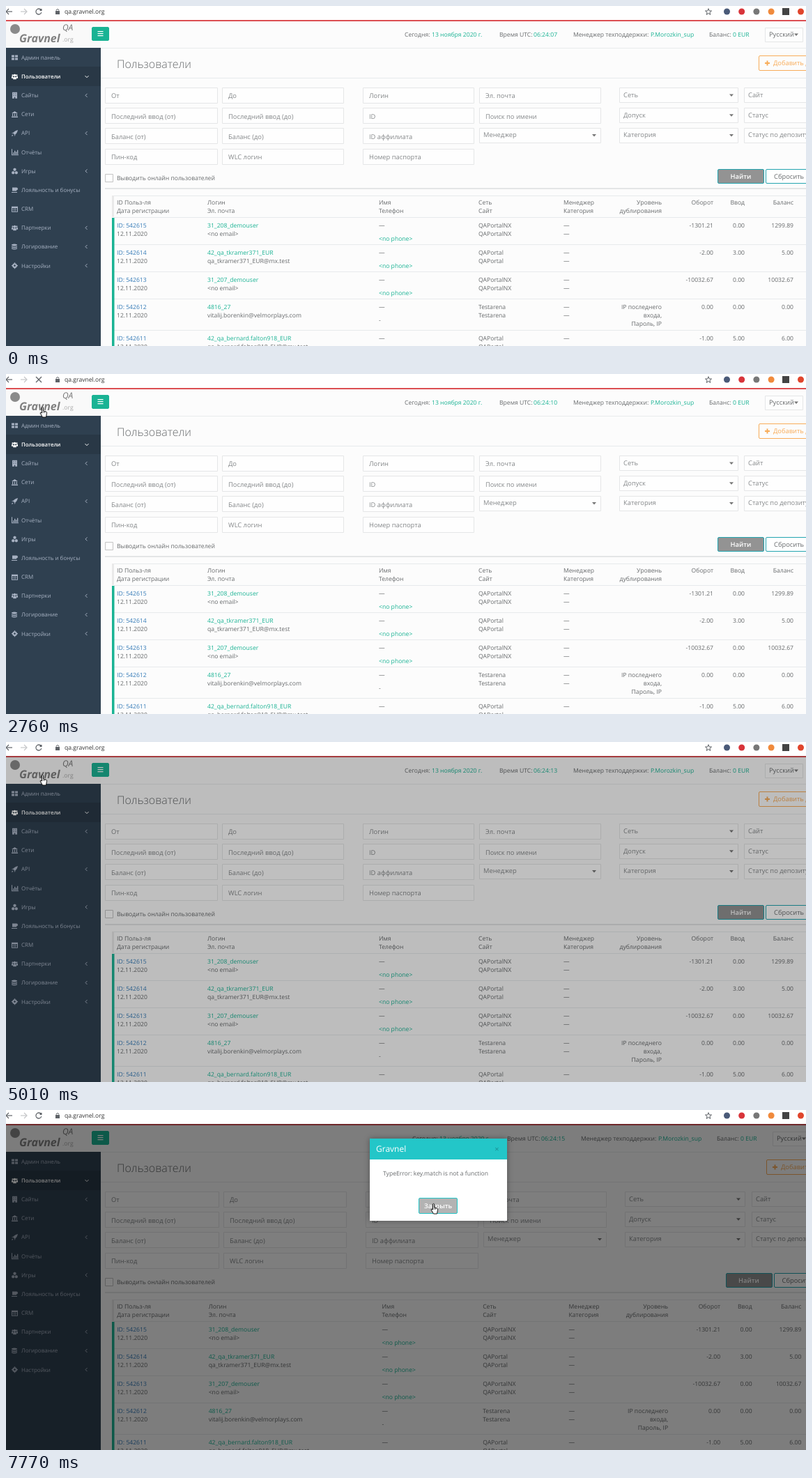
An HTML page with a canvas for the animation above (8000 ms loop, 1148 by 488 pixels).

```html
<!DOCTYPE html>
<html lang="ru">
<head>
<meta charset="utf-8">
<style>
html, body { margin: 0; width: 100%; height: 100%; overflow: hidden; background: #fff; }
canvas { display: block; }
</style>
</head>
<body>
<canvas id="stage" width="1148" height="488"></canvas>
<script>
const W = 1148, H = 488, LOOP = 8000;
const c = document.getElementById('stage').getContext('2d');
const GREY = '#676a6c', GREEN = '#1ab394', BLUE = '#337ab7', LINE = '#e5e6e7',
      TEAL = '#23a5b0', ORANGE = '#f8ac59', NAVY = '#2f4050';

// Stepped tracks: [start time, values...]
const CURSOR = [[0, -50, 0], [650, 985, 450], [770, 868, 386], [920, 390, 183], [1070, 246, 106],
  [1190, 155, 62], [1310, 110, 50], [1430, 88, 46], [1580, 72, 50], [1700, 56, 50, 1], [1820, 52, 48, 1],
  [6070, 150, 70], [6190, 430, 120], [6310, 697, 132], [6450, 640, 138], [6570, 622, 137, 1], [6720, 613, 135, 1]];
const CLOCK = [[0, 7], [650, 8], [1700, 9], [2760, 10], [3660, 11], [4620, 12], [4740, 13], [6720, 14], [7770, 15]];
const ENTRY = [[0, 0, 1], [4190, 0, 0], [4340, 16, .12], [4470, 13, .3], [4620, 8, .6], [4740, 4, .85], [4890, 2, .95], [5010, 0, 1]];
const DIM = [[0, 0], [5010, .25], [5130, .5]];
const MODAL = [[0, 0], [5270, .4], [5400, .75], [5550, .92], [5800, 1]];
const at = (track, t) => track.findLast(k => k[0] <= t);

const MENU = ['Админ панель', 'Пользователи', 'Сайты', 'Сети', 'API', 'Отчёты', 'Игры',
  'Лояльность и бонусы', 'CRM', 'Партнерки', 'Логирование', 'Настройки'];
const OPENABLE = [1, 2, 4, 6, 9, 10, 11];
const PEOPLE = 'M4.5 1a1.8 1.8 0 1 1-.01 0zM1.6 1.5a1.2 1.2 0 1 1-.01 0zM7.4 1.5a1.2 1.2 0 1 1-.01 0zM2.2 8.5V6q0-1 1-1h2.6q1 0 1 1v2.5zM0 7V5q0-.8 1-.8h1V7zM7 7V4.2h1q1 0 1 .8v2z';
const ICONS = [
  'M0 1h4v3H0zM5 1h4v3H5zM0 5h4v3H0zM5 5h4v3H5z',
  PEOPLE,
  'M1 0h7v9H1zM2.5 1.5h1v1h-1zM5.5 1.5h1v1h-1zM2.5 4h1v1h-1zM5.5 4h1v1h-1zM3.8 7h1.4v2H3.8z',
  'M0 3L4.5 0 9 3zM1 3.5h1.2V7H1zM3.9 3.5h1.2V7H3.9zM6.8 3.5H8V7H6.8zM0 7.5h9V9H0z',
  'M9 0Q8 5 4.5 7L2 4.5Q4 1 9 0zM0 5l3-2-1.5 2zM4 9l2-2.5-2 1zM0 9l1-2.5L2.5 8z',
  'M0 0h1v8h9v1H0zM2 5h1.3v2.5H2zM4 2.5h1.3v5H4zM6 4h1.3v3.5H6zM8 1.5h1.3v6H8z',
  'M4.5 0l2 1v2.5l-2 1-2-1V1zM2.2 4.5l2 1V8l-2 1-2-1V5.5zM6.8 4.5l2 1V8l-2 1-2-1V5.5z',
  'M1 1h6q2 0 2 2T7 5v1H1zM0 7.5h8v1H0z',
  'M0 1h9v8H0zM1 3.5h2v2H1zM3.5 3.5h2v2h-2zM6 3.5h2v2H6zM1 6h2v2H1zM3.5 6h2v2h-2zM6 6h2v2H6z',
  PEOPLE,
  'M0 1.5q4-2 8 0v1q-4 2-8 0zM0 3.8q4 2 8 0v1.4q-4 2-8 0zM0 6.3q4 2 8 0v1.2q-4 2-8 0z',
  'M4.5 1a3.5 3.5 0 1 1-.01 0zM4.5 3.2a1.3 1.3 0 1 1-.01 0zM3.8 0h1.4v1H3.8zM3.8 8h1.4v1H3.8zM0 3.8h1v1.4H0zM8 3.8h1v1.4H8z'
].map(d => new Path2D(d));
const ARROW = new Path2D('M0 0v10.5l2.5-2.3 1.8 4 1.6-.7-1.8-3.9h3.4z');
const HAND = new Path2D('M-.5 0q1-1.2 2 0v5l4 1q1.5.5 1 2.5L5.5 14H.5l-3.5-6q0-1.5 2.5 0z');

// Filter columns: left, right, labels; a leading "*" marks a drop-down
const FILTERS = [
  [142, 304, 'От', 'Последний ввод (от)', 'Баланс (от)', 'Пин-код'],
  [310, 485, 'До', 'Последний ввод (до)', 'Баланс (до)', 'WLC логин'],
  [512, 672, 'Логин', 'ID', 'ID аффилиата', 'Номер паспорта'],
  [679, 854, 'Эл. почта', 'Поиск по имени', '*Менеджер'],
  [880, 1051, '*Сеть', '*Допуск', '*Категория'],
  [1059, 1230, '*Сайт', '*Статус', '*Статус по депозиту']];
const HEADS = [[159, 'ID Польз-ля', 'Дата регистрации'], [289, 'Логин', 'Эл. почта'], [535, 'Имя', 'Телефон'],
  [678, 'Сеть', 'Сайт'], [800, 'Менеджер', 'Категория'], [-941, 'Уровень', 'дублирования'],
  [-1015, 'Оборот'], [-1060, 'Ввод'], [-1130, 'Баланс']];
const ROWS = [
  [315, 542615, '31_208_demouser', '<no email>', 'QAPortalNX', '-1301.21', '0.00', '1299.89'],
  [354, 542614, '42_qa_tkramer371_EUR', 'qa_tkramer371_EUR@mx.test', 'QAPortal', '-2.00', '3.00', '5.00'],
  [393, 542613, '31_207_demouser', '<no email>', 'QAPortalNX', '-10032.67', '0.00', '10032.67'],
  [432, 542612, '4816_27', 'vitalij.borenkin@velmorplays.com', 'Testarena', '0.00', '0.00', '0.00'],
  [477, 542611, '42_qa_bernard.falton918_EUR', 'qa_bernard.falton918_EUR@mx.test', 'QAPortal', '-1.00', '5.00', '6.00']];
const EDGES = [303, 342, 381, 420, 465];

function text(s, x, y, color = GREY, size = 8.6, style = '', align = 'left') {
  c.font = `${style} ${size}px "Open Sans", "Noto Sans", sans-serif`;
  c.fillStyle = color;
  c.textAlign = align;
  c.fillText(s, x, Math.round(y + size * .36));
}
function rect(x, y, w, h, color) {
  c.fillStyle = color;
  c.fillRect(x, y, w, h);
}
function box(x, y, w, h, fill, border, radius = 0) {
  c.beginPath();
  c.roundRect(x + .5, y + .5, w - 1, h - 1, radius);
  c.fillStyle = fill;
  c.fill();
  c.strokeStyle = border;
  c.lineWidth = 1;
  c.stroke();
}
function line(points, color, width = 1) {
  c.beginPath();
  points.forEach(([x, y]) => c.lineTo(x, y));
  c.strokeStyle = color;
  c.lineWidth = width;
  c.stroke();
}
function dot(x, y, r, color) {
  c.beginPath();
  c.arc(x, y, r, 0, 7);
  c.fillStyle = color;
  c.fill();
}
function triangle(x, y) {
  c.beginPath();
  c.moveTo(x - 3, y - 1.5);
  c.lineTo(x + 3, y - 1.5);
  c.lineTo(x, y + 2);
  c.fillStyle = '#777';
  c.fill();
}

function browserBar(loading) {
  rect(0, 0, W, 20, '#fff');
  for (const [x, d, color] of [[4, 1, '#5f6368'], [26, -1, '#c4c6c8']]) {
    line([[x - 4 * d, 8], [x + 5 * d, 8]], color, 1.2);
    line([[x, 4], [x - 4 * d, 8], [x, 12]], color, 1.2);
  }
  if (loading) {
    line([[43, 4], [51, 12]], '#5f6368', 1.3);
    line([[51, 4], [43, 12]], '#5f6368', 1.3);
  } else {
    c.beginPath();
    c.arc(47, 8, 4, .3, 5.4);
    c.strokeStyle = '#5f6368';
    c.lineWidth = 1.3;
    c.stroke();
    rect(48.5, 4, 3, 3, '#5f6368');
  }
  rect(71, 7, 6, 5, '#5f6368');
  c.beginPath();
  c.arc(74, 6.5, 1.9, Math.PI, 0);
  c.strokeStyle = '#5f6368';
  c.lineWidth = 1;
  c.stroke();
  text('qa.gravnel.org', 84, 8, '#333');
  const star = [...Array(11)].map((_, i) => {
    const r = i % 2 ? 2 : 4.8, a = i * Math.PI / 5;
    return [1008 + r * Math.sin(a), 8.5 - r * Math.cos(a)];
  });
  line(star, '#5f6368');
  ['#4a5a78', '#d8343a', '#777', '#f08a3c', '', '#e0452c'].forEach((color, i) => color && dot(1034.5 + i * 21.2, 8, 4.5, color));
  rect(1114, 3, 10, 10, '#444');
  rect(0, 20, W, 2, '#dc4e52');
}

function sidebar(active) {
  rect(0, 60, 136, H - 60, NAVY);
  if (active) rect(0, 87, 136, 28, '#293846');
  MENU.forEach((label, i) => {
    const y = 74 + i * 27.15, on = active && i === 1, color = on ? '#fff' : '#a7b1c2';
    c.save();
    c.translate(8, y - 4.5);
    c.fillStyle = color;
    c.fill(ICONS[i], 'evenodd');
    c.restore();
    text(label, 22, y, color, on ? 7.8 : 8, on ? '600' : '');
    if (on) line([[113.5, y - 1], [116, y + 1.5], [118.5, y - 1]], color);
    else if (OPENABLE.includes(i)) line([[116.5, y - 2.5], [114, y], [116.5, y + 2.5]], color);
  });
}

function logo() {
  rect(0, 22, 136, 38, '#f9f9f9');
  dot(13, 33, 7, '#8a8a8a');
  text('Gravnel', 19, 46, '#808080', 16, 'italic 700');
  text('QA', 81, 31, '#777', 12, 'italic');
  text('.org', 81, 48, '#aaa', 8.6);
}

function topbar(bare, dx, seconds) {
  box(123, 30, 25, 20, GREEN, GREEN, 1.5);
  for (const y of [36, 39, 42]) rect(131.5, y, 8, 1.2, '#fff');
  const y = bare ? 43 : 41, back = bare ? -17 : dx;
  text('Сегодня:', bare ? 666 : 572 + dx, y);
  text('Время UTC:', bare ? 727 : 708 + dx, y);
  if (!bare) {
    text('13 ноября 2020 г.', 611 + dx, y, GREEN);
    text('06:24:' + String(seconds).padStart(2, '0'), 757 + dx, y, GREEN);
  }
  text('Менеджер техподдержки:', 814 + back, y);
  text('P.Morozkin_sup', 925 + back, y, GREEN);
  text('Баланс:', 1009 + back, y);
  text('0 EUR', 1043 + back, y, GREEN);
  if (bare) {
    box(1071, 31, 73, 22, '#f3f3f3', LINE);
    text('Русский', 1082, 42, GREY, 9.33);
    line([[1134.5, 41], [1137, 43.5], [1139.5, 41]], '#555', 1.3);
  } else {
    box(1089 + dx, 31, 55, 21, '#fdfdfd', LINE);
    text('Русский', 1095 + dx, 41, GREY, 9.33);
    triangle(1134 + dx, 41);
  }
}

function titleBand(dx, bg) {
  text('Пользователи', 159, 83, GREY, 16, '300');
  rect(136, 103, W, 1, '#e7eaec');
  box(1080 + dx, 71, 100, 22, bg, ORANGE, 1.5);
  rect(1089 + dx, 81, 7, 2, ORANGE);
  rect(1091.5 + dx, 78.5, 2, 7, ORANGE);
  text('Добавить депозит', 1101 + dx, 82, ORANGE, 9.33);
}

function content(shift, alpha, wide, hover) {
  const X = x => x + shift + (wide ? (x - 142) * .0115 : 0);
  const cell = (s, x, y, color) => text(s, X(Math.abs(x)), y, color, 8.6, '', x < 0 ? 'right' : 'left');
  c.globalAlpha = alpha;

  for (const [left, right, ...labels] of FILTERS) labels.forEach((label, i) => {
    const drop = label[0] === '*', y = 117 + i * 29.2 - (drop ? .4 * i : 0);
    const x = Math.round(X(left)), x2 = Math.round(X(right));
    box(x, Math.round(y), x2 - x, drop ? 22 : 23, '#fefefe', LINE);
    text(drop ? label.slice(1) : label, x + (drop ? 6 : 9), y + (drop ? 10.5 : 12), '#85888a', 9.33);
    if (drop) triangle(x2 - 10, y + 11);
  });

  box(142 + shift, 241, 12, 12, '#fff', '#c4c4c4');
  text('Выводить онлайн пользователей', 159 + shift, 247);
  const dx = shift + (wide ? 11.5 : 0);
  box(Math.round(1021 + dx), 234, 67, 21, '#939393', TEAL, 1.5);
  text('Найти', 1054.5 + dx, 245, '#fff', 9.33, '600', 'center');
  box(Math.round(1090 + dx), 234, 90, 21, '#fff', TEAL, 1.5);
  text('Сбросить', 1102 + dx, 245, GREY, 9.33);

  rect(142 + shift, 261, W, 2, '#e4e5e6');
  rect(152 + shift, 272, W, 1, '#e7eaec');
  rect(152 + shift, 272, 3, 31, '#e9e9e9');
  if (hover >= 0) rect(156, EDGES[hover], W, EDGES[hover + 1] - EDGES[hover], '#e5e6e6');
  for (const y of EDGES) rect(155 + shift, y, W, 1, '#e7eaec');
  rect(152 + shift, 304, 3.5, H, GREEN);

  for (const [x, a, b = ''] of HEADS) {
    cell(a, x, 282);
    cell(b, x, 294);
  }
  ROWS.forEach(([y, id, login, mail, net, ...sums], i) => {
    cell('ID: ' + id, 159, y, BLUE);
    cell('12.11.2020', 159, y + 12);
    cell(login, 289, y, GREEN);
    cell(mail, 289, y + 12);
    cell('—', 535, y);
    if (i === 3) {
      cell('-', 535, y + 19);
      ['IP последнего', 'входа,', 'Пароль, IP'].forEach((s, k) => cell(s, -941, y + 12 * k));
    } else cell('<no phone>', 535, y + 19, GREEN);
    for (const k of [0, 12]) {
      cell(net, 678, y + k);
      cell('—', 800, y + k);
    }
    sums.forEach((s, k) => cell(s, [-1015, -1060, -1130][k], y));
  });
  c.globalAlpha = 1;
}

// The dialog brightens from the dimmed page's grey as one flat layer
function dialog(level, hover) {
  if (!level) return;
  c.shadowColor = `rgba(0,0,0,${.35 * level})`;
  c.shadowBlur = 8;
  rect(522, 41, 197, 118, '#fff');
  c.shadowBlur = 0;
  c.shadowColor = 'transparent';
  rect(522, 41, 197, 30, '#23c6c8');
  text('Gravnel', 531, 56, '#fff', 12);
  text('×', 704.5, 56, '#1a8f92', 11, '', 'center');
  text('TypeError: key.match is not a function', 541, 91);
  box(592, 126, 56, 23, hover ? '#b3b3b3' : '#808080', '#23c6c8', 1.5);
  text('Закрыть', 620, 137.5, '#fff', 9.33, '600', 'center');
  rect(522, 41, 197, 118, `rgba(127,127,127,${1 - level})`);
}

function pointer([, x, y, hand]) {
  c.save();
  c.translate(x, y);
  c.fillStyle = '#fff';
  c.strokeStyle = '#111';
  c.lineWidth = 1;
  c.fill(hand ? HAND : ARROW);
  c.stroke(hand ? HAND : ARROW);
  if (hand) for (const k of [1.7, 3.7]) line([[k, 5.5], [k, 8]], '#111', .7);
  c.restore();
}

function draw(t) {
  const bare = t >= 4190 && t < 4620, wide = t >= 5130, dx = wide ? 11 : 0;
  const bg = bare ? '#f3f3f3' : '#fcfcfc';
  const [, shift, alpha] = at(ENTRY, t);
  rect(0, 0, W, H, bg);
  if (bare) rect(0, 22, W, 9, '#fcfcfc');
  else rect(136, 60, W, 1, '#e9ebec');
  browserBar(t >= 2360 && t < 5010);
  if (alpha) content(shift, alpha, wide, t < 650 || t >= 920 ? -1 : t < 770 ? 3 : 2);
  logo();
  sidebar(!bare);
  topbar(bare, dx, at(CLOCK, t)[1]);
  titleBand(dx, bg);
  rect(0, 20, W, H, `rgba(0,0,0,${at(DIM, t)[1]})`);
  dialog(at(MODAL, t)[1], t >= 6450);
  pointer(at(CURSOR, t));
}

c.textRendering = 'geometricPrecision';
const start = performance.now();
(function tick() {
  draw((performance.now() - start) % LOOP);
  requestAnimationFrame(tick);
})();
</script>
</body>
</html>
```
